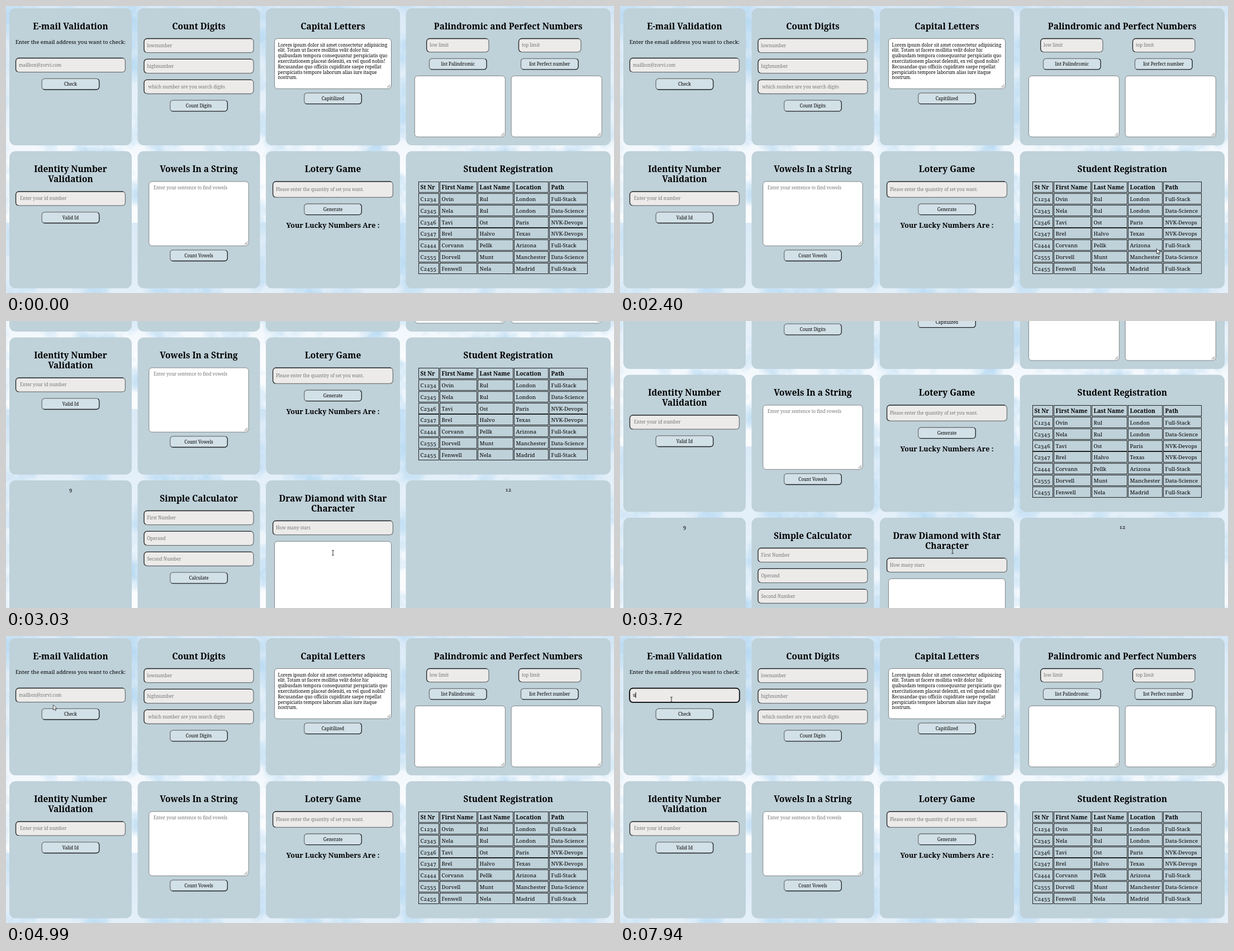
An HTML page that plays this animation: 1088 px wide and 515 px high, repeating every 8000 ms.

```html
<!DOCTYPE html>
<html lang="en">
<head>
<meta charset="utf-8">
<title>Form cards</title>
<style>
  html, body { margin: 0; width: 100%; height: 100%; overflow: hidden; }
  #stage { position: relative; width: 100%; height: 100%; overflow: hidden; contain: strict; }
  svg { position: absolute; left: 0; top: 0; }
  #page { will-change: transform; }
  text { font: 8px "Noto Serif", serif; font-variant-numeric: oldstyle-nums; white-space: pre; }
  .title { font-size: 15.4px; font-weight: bold; }
  .lucky { font-size: 12.5px; font-weight: bold; }
  .head { font-size: 10.2px; font-weight: bold; }
  .body { font-size: 9.65px; }
  .hint { fill: #757575; }
  .mid { text-anchor: middle; }
</style>
</head>
<body>
<div id="stage">
<svg id="page" width="1088" height="773">
  <defs>
    <linearGradient id="inset" x2="1" y2="1">
      <stop offset=".5" stop-color="#1b1f21"/><stop offset=".5" stop-color="#707577"/>
    </linearGradient>
    <linearGradient id="outset" x2="1" y2="1">
      <stop offset=".5" stop-color="#707577"/><stop offset=".5" stop-color="#1b1f21"/>
    </linearGradient>
    <linearGradient id="sky" gradientUnits="userSpaceOnUse" x1="0" y1="0" x2="0" y2="389" spreadMethod="repeat">
      <stop offset="0" stop-color="#dbeaf7"/><stop offset=".5" stop-color="#e8f2fa"/><stop offset=".75" stop-color="#fafcfe"/>
    </linearGradient>
    <filter id="watercolor" x="0" y="0" width="1" height="1" color-interpolation-filters="sRGB">
      <feTurbulence type="fractalNoise" baseFrequency=".016" numOctaves="6" seed="4"/>
      <feColorMatrix values="0 0 0 0 .72  0 0 0 0 .855  0 0 0 0 .95  2.5 0 0 0 -1.05"/>
    </filter>
  </defs>
  <rect width="1088" height="773" fill="url(#sky)"/>
  <rect width="1088" height="773" filter="url(#watercolor)"/>
  <g id="cards"></g>
  <g id="focus">
    <rect x="17" y="93.7" width="197" height="25.4" rx="6" fill="none" stroke="#0c0e0f" stroke-width="1.6"/>
    <text id="typed" x="23" y="109">u</text>
    <rect id="caret" y="101" width="1" height="10"/>
  </g>
</svg>
<svg width="1088" height="515">
  <g id="cursor">
    <path id="arrow" d="M.4 .5V9.6L2.5 7.7L4 11L5.6 10.3L4.1 7.1H6.9Z" fill="#fff" stroke="#222" stroke-width=".8"/>
    <path id="beam" d="M-2 -4.2H2M0 -4V4M-2 4.2H2" stroke="#222" stroke-width=".9"/>
  </g>
</svg>
</div>
<script>
const $ = id => document.getElementById(id);
const GAP = 10.5, ROW = 256.5, WIDTHS = [219, 219, 240, 366.5];

const box = (x, y, w, h, r, fill, stroke = "none", line = 1) =>
  `<rect x="${x}" y="${y}" width="${w}" height="${h}" rx="${r}" fill="${fill}" stroke="${stroke}" stroke-width="${line}"/>`;
const label = (x, y, str, cls = "") => `<text x="${x}" y="${y}" class="${cls}">${str}</text>`;

// A part takes its centre, top and card width, and returns its markup and the height it uses.
const title = (...lines) => (cx, y) =>
  [lines.map((s, i) => label(cx, y + 37.5 + i * 18, s, "title mid")).join(""), 36 + lines.length * 18];
const line = (str, dy, cls = "body") => (cx, y) => [label(cx, y + dy, str, cls + " mid"), 35];
const button = str => (cx, y) =>
  [box(cx - 51.3, y + .5, 102.6, 19.6, 5, "#d2e0e7", "url(#outset)", 1.3) + label(cx, y + 13.2, str, "mid"), 20.6 + GAP];
const input = (hint, h = 26.4, width) => (cx, y, cardWidth) => {
  const w = width ?? cardWidth * .9, x = cx - w / 2;
  return [box(x + .6, y + .5, w - 1.2, h - 1.2, 5.5, "#ecebea", "url(#inset)", 1.3) +
    label(x + 6, y + h / 2 + 2.7, hint, "hint"), h + GAP];
};
const area = (w, h, str = "", cls = "") => (cx, y) => {
  const x = cx - w / 2, top = y + .5;
  const grip = `<path d="M${x + w - 7.5} ${top + h - 2}l5.5 -5.5m-2.5 5.5l2.5 -2.5" stroke="#444" stroke-width=".8"/>`;
  const lines = str.split("\n").map((s, i) => label(x + 6, top + 14 + i * 9.8, s, cls)).join("");
  return [box(x, top, w, h, 5.5, "#fff", "#767b7d", .9) + grip + lines, h + 7.6];
};
const pair = (left, right, shift, spread) => (cx, y) => {
  const [a, height] = left(cx + shift - spread, y);
  return [a + right(cx + shift + spread, y)[0], height];
};
const table = (rows, widths) => (cx, y) => {
  const half = v => Math.floor(v) + .5;
  const cells = rows.map((row, r) => {
    let x = cx - 160.5;
    const top = half(y + 1.4 + r * 20.77);
    return row.map((str, c) => {
      const cell = box(half(x), top, widths[c], 19, 0, "none", "#111", .9) +
        label(x + 3.3, top + 13, str, r ? "body" : "head");
      x += widths[c] + 2;
      return cell;
    }).join("");
  });
  return [cells.join(""), rows.length * 20.77];
};

const LOREM = `Lorem ipsum dolor sit amet consectetur adipisicing
elit. Totam ut facere mollitia velit dolor hic
quibusdam tempora consequuntur perspiciatis quo
exercitationem placeat deleniti, ex vel quod nobis!
Recusandae quo officiis cupiditate saepe repellat
perspiciatis tempore laborum alias iure itaque
nostrum.`;
const STUDENTS = `St Nr,First Name,Last Name,Location,Path
C1234,Ovin,Rul,London,Full-Stack
C2345,Nela,Rul,London,Data-Science
C2346,Tavi,Ost,Paris,NVK-Devops
C2347,Brel,Halvo,Texas,NVK-Devops
C2444,Corvann,Pellk,Arizona,Full-Stack
C2555,Dorvell,Munt,Manchester,Data-Science
C2455,Fenwell,Nela,Madrid,Full-Stack`.split("\n").map(row => row.split(","));

const CARDS = [
  [title("E-mail Validation"), line("Enter the email address you want to check:", 10.3),
    input("mailbox@zorvi.com"), button("Check")],
  [title("Count Digits"), input("lownumber"), input("highnumber"),
    input(" which number are you search digits"), button("Count Digits")],
  [title("Capital Letters"), area(209, 90, LOREM), button("Capitilized")],
  [title("Palindromic and Perfect Numbers"),
    pair(input("low limit", 25.3, 112.5), input("top limit", 25.3, 112.5), -8, 82.4),
    pair(button("list Palindromic"), button("list Perfect number"), -8, 82),
    pair(area(162, 109.5), area(162, 109.5), 0, 86.4)],
  [title("Identity Number", "Validation"), input(" Enter your id number"), button("Valid Id")],
  [title("Vowels In a String"), area(178.3, 115.3, " Enter your sentence to find vowels", "hint"), button("Count Vowels")],
  [title("Lotery Game"), input("Please enter the quantity of set you want.", 29.5), button("Generate"),
    line("Your Lucky Numbers Are :", 12.7, "lucky")],
  [title("Student Registration"), table(STUDENTS, [36, 66, 63, 61, 68])],
  [line("9", 19.8)],
  [title("Simple Calculator"), input("First Number"), input("Operand"), input("Second Number"), button("Calculate")],
  [title("Draw Diamond with Star", "Character"), input("How many stars"), area(209, 132)],
  [line("12", 19.8)]
];

$("cards").innerHTML = CARDS.map((parts, i) => {
  const col = i % 4, w = WIDTHS[col];
  const x = WIDTHS.slice(0, col).reduce((sum, v) => sum + v + GAP, 6);
  let y = 4 + Math.floor(i / 4) * ROW;
  const back = box(x, y, w, ROW - GAP, 11, "#bfd1d9");
  return back + parts.map(part => {
    const [svg, height] = part(x + w / 2, y, w);
    y += height;
    return svg;
  }).join("");
}).join("");

// Arrival time and place of each pointer stop; a move lasts at most LEG ms.
const LEG = 740;
const STOPS = [[70, 980, 476], [810, 64, 220], [1640, 663, 244], [2250, 989, 444], [2400, 960, 435],
  [2760, 586, 422], [3030, 585, 416], [3510, 595, 413], [4990, 84, 123], [5180, 87, 110], [5860, 92, 114]];
const EDITS = [5350, 6260, 7940], ERASED = 7060, BLINK = 530;

function ramp(t, start, length) {
  const p = Math.min(1, Math.max(0, (t - start) / length));
  return p * p * (3 - 2 * p);
}
function pointer(t) {
  let [before, x, y] = STOPS[0];
  for (const [arrive, toX, toY] of STOPS.slice(1)) {
    const length = Math.min(LEG, arrive - before);
    const p = ramp(t, arrive - length, length);
    x += (toX - x) * p;
    y += (toY - y) * p;
    before = arrive;
  }
  return [x, y];
}
const within = (t, from, to = 8000) => t >= from && t < to;
const show = (id, on) => $(id).style.display = on ? "" : "none";
const hint = [...document.querySelectorAll(".hint")][0];
hint.id = "hint";

function draw(now) {
  const t = now % 8000;
  const scroll = 258 * (ramp(t, 2828, 254) - ramp(t, 3590, 320));
  $("page").style.transform = `translateY(${-Math.round(scroll)}px)`;

  const beam = within(t, 2980, 3880) || within(t, 5100);
  $("cursor").setAttribute("transform", `translate(${pointer(t)})`);
  show("cursor", t >= STOPS[0][0]);
  show("beam", beam);
  show("arrow", !beam);

  const [focused, firstKey, secondKey] = EDITS;
  const typed = within(t, firstKey, ERASED) || within(t, secondKey);
  const lastEdit = EDITS.filter(e => e <= t).at(-1);
  show("focus", t >= focused);
  show("typed", typed);
  show("hint", !typed);
  show("caret", (t - lastEdit) % (2 * BLINK) < BLINK);
  $("caret").setAttribute("x", typed ? 27.6 : 23);
  requestAnimationFrame(draw);
}
requestAnimationFrame(draw);
</script>
</body>
</html>
```
